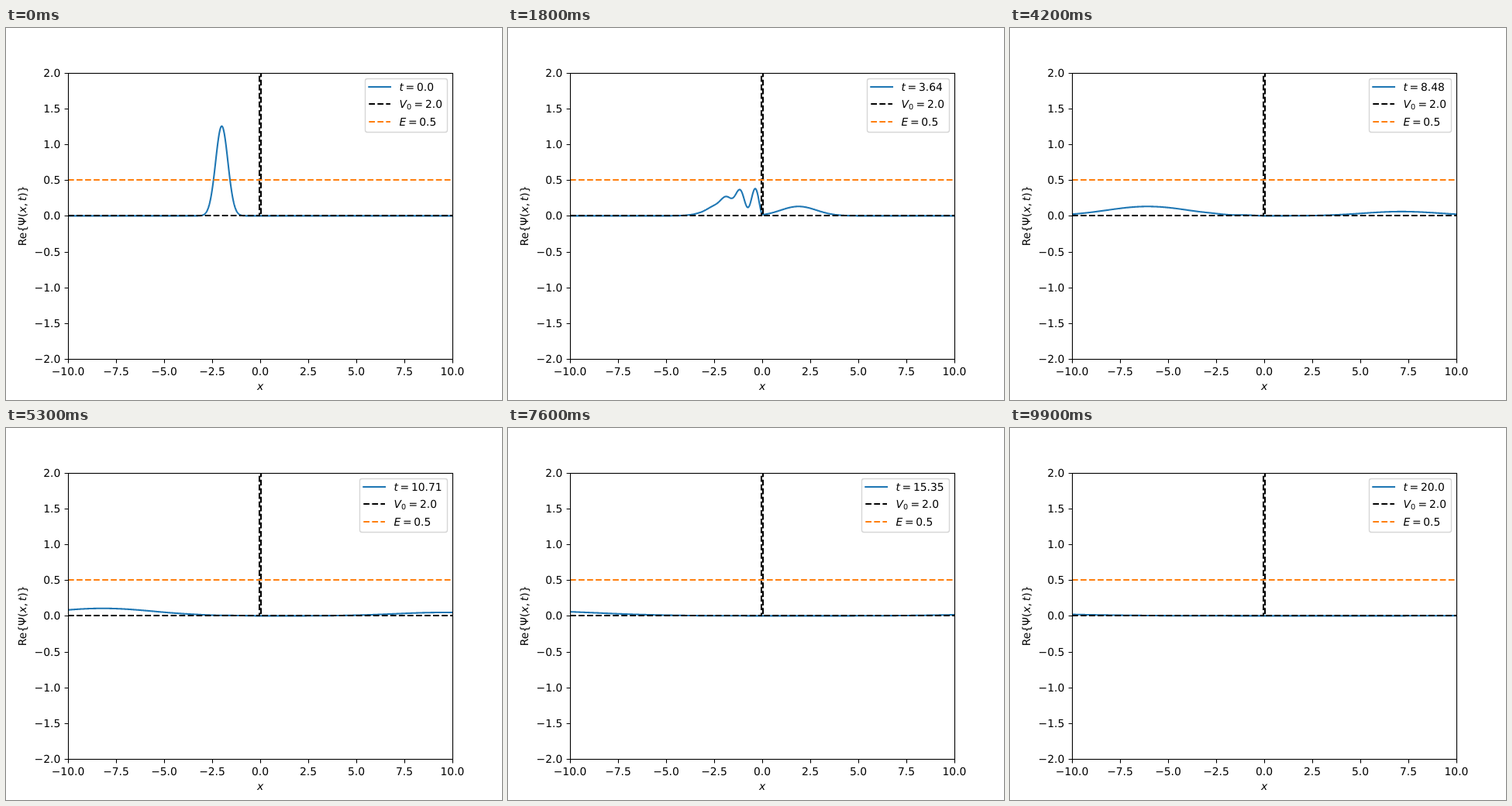
Recreate the animation shown at these times as an HTML page. Size 640 by 480 pixels, loop 10 s.

```html
<!DOCTYPE html>
<html lang="en">
<head>
<meta charset="utf-8">
<title>Wave packet at a barrier</title>
<style>
  html, body { margin: 0; width: 100%; height: 100%; overflow: hidden; background: #fff; }
  svg { display: block; width: 640px; height: 480px; }
  text { font: 13.889px "DejaVu Sans", sans-serif; text-rendering: geometricPrecision; white-space: pre; }
  .it { font-style: italic; }
  .line { fill: none; stroke-width: 2.083; stroke-linejoin: round; }
  .dash { stroke-dasharray: 7.708 3.333; }
  .wave { stroke: #1f77b4; }
  .wall { stroke: #000; stroke-linejoin: miter; }
  .energy { stroke: #ff7f0e; }
  .axis { fill: none; stroke: #000; stroke-width: 1.111; }
</style>
</head>
<body>
<svg viewBox="0 0 640 480">
  <clipPath id="plot"><rect x="80" y="58" width="496" height="369"/></clipPath>
  <g clip-path="url(#plot)">
    <path id="wave" class="line wave"/>
    <path class="line wall dash" d="M80 242H327V58H329V242H576"/>
    <path class="line energy dash" d="M80 196H576"/>
  </g>
  <path id="ticks" class="axis"/>
  <rect class="axis" x="80.5" y="58.5" width="496" height="369"/>
  <g id="labels"></g>
  <text class="it" x="328" y="467" text-anchor="middle">x</text>
  <text transform="translate(26 242.4) rotate(-90)" text-anchor="middle">Re{Ψ(<tspan class="it">x</tspan>,<tspan class="it" dx="2.7">t</tspan>)}</text>

  <rect id="box" y="65.5" height="69" rx="2.8" fill="#fff" stroke="#d6d6d6" stroke-width="1.389"/>
  <g id="legend">
    <path class="line wave" stroke-linecap="square" d="M468.3 76H496"/>
    <path class="line wall dash" d="M468.3 98H496"/>
    <path class="line energy dash" d="M468.3 121H496"/>
    <text x="507.4" y="81"><tspan class="it">t</tspan><tspan dx="2.7">=</tspan><tspan id="clock" dx="2.7">0.0</tspan></text>
    <text x="507.4" y="103"><tspan class="it">V</tspan><tspan dy="2.2" font-size="9.722" style="font-size:9.722px">0</tspan><tspan dx="3.5" dy="-2.2">=</tspan><tspan dx="2.7">2.0</tspan></text>
    <text x="507.4" y="126"><tspan class="it">E</tspan><tspan dx="2.7">=</tspan><tspan dx="2.7">0.5</tspan></text>
  </g>
</svg>
<script>
const $ = id => document.getElementById(id);

// Axes
const toX = x => 328 + 24.8 * x;
const toY = y => 242.4 - 92.4 * y;
const snap = v => Math.floor(v + 0.5) + 0.5;
let ticks = '';
function label(x, y, value, anchor) {
  const el = document.createElementNS('http://www.w3.org/2000/svg', 'text');
  el.setAttribute('x', x);
  el.setAttribute('y', y);
  el.setAttribute('text-anchor', anchor);
  el.textContent = value.toFixed(1).replace('-', '\u2212');
  $('labels').append(el);
}
for (let i = 0; i < 9; i++) {
  const x = 2.5 * i - 10, y = 0.5 * i - 2;
  ticks += `M${snap(toX(x))} 427.5v4.9M80.5 ${snap(toY(y))}h-4.9`;
  label(toX(x), 448, x, 'middle');
  label(70.3, Math.round(toY(y) + 5), y, 'end');
}
$('ticks').setAttribute('d', ticks);

// Gaussian packet on a square barrier, with m = 1 and h = 1
const WIDTH = 0.1, V0 = 2, START = -2, P0 = 1, SIGMA = 0.25;
const NP = 640, DP = 0.005, P_MIN = -0.6;
const NX = 801, DX = 0.025;
const TAU = 2 * Math.PI;
const K2 = 2 * V0 * TAU * TAU;
const stateRe = new Float64Array(NX * NP), stateIm = new Float64Array(NX * NP);
const waveNum = new Float64Array(NP), weight = new Float64Array(NP);

// Scattering state for each momentum, at every x
for (let j = 0; j < NP; j++) {
  const p = P_MIN + (j + 0.5) * DP, k = TAU * p;
  const kap2 = K2 - k * k, q = Math.sqrt(Math.abs(kap2));
  const ch = d => kap2 > 0 ? Math.cosh(q * d) : Math.cos(q * d);
  const sh = d => (kap2 > 0 ? Math.sinh(q * d) : Math.sin(q * d)) / q;
  const S = sh(WIDTH);
  const dr = 2 * k * ch(WIDTH), di = (kap2 - k * k) * S, n = dr * dr + di * di;
  const tr = 2 * k * dr / n, ti = -2 * k * di / n;
  const rr = -K2 * S * di / n, ri = -K2 * S * dr / n;
  waveNum[j] = k;
  weight[j] = DP * (TAU * SIGMA ** 2) ** -0.25 * Math.exp(-((p - P0) ** 2) / (4 * SIGMA ** 2));

  for (let i = 0; i < NX; i++) {
    const x = i * DX - 10, at = i * NP + j;
    if (x < -WIDTH / 2) {
      const c = Math.cos(k * (x + WIDTH / 2)), s = Math.sin(k * (x + WIDTH / 2));
      stateRe[at] = c + rr * c + ri * s;
      stateIm[at] = s + ri * c - rr * s;
    } else {
      const d = x - WIDTH / 2, inside = d < 0;
      const c = inside ? ch(d) : Math.cos(k * d);
      const s = inside ? k * sh(d) : Math.sin(k * d);
      stateRe[at] = tr * c - ti * s;
      stateIm[at] = tr * s + ti * c;
    }
  }
}

const phaseRe = new Float64Array(NP), phaseIm = new Float64Array(NP);
function wavePath(t) {
  for (let j = 0; j < NP; j++) {
    const k = waveNum[j];
    const a = -k * (START + WIDTH / 2) - k * k * t / (2 * TAU);
    phaseRe[j] = weight[j] * Math.cos(a);
    phaseIm[j] = weight[j] * Math.sin(a);
  }
  const points = [];
  for (let i = 0, at = 0; i < NX; i++) {
    let re = 0, im = 0;
    for (let j = 0; j < NP; j++, at++) {
      re += phaseRe[j] * stateRe[at] - phaseIm[j] * stateIm[at];
      im += phaseRe[j] * stateIm[at] + phaseIm[j] * stateRe[at];
    }
    points.push(toX(i * DX - 10).toFixed(2) + ' ' + toY(re * re + im * im).toFixed(2));
  }
  return 'M' + points.join('L');
}

// 100 steps of 100 ms covering t = 0 to 20
const STEPS = 100;
let shown = -1;
function draw() {
  const step = Math.floor(performance.now() / 100) % STEPS;
  if (step !== shown) {
    shown = step;
    const t = 20 * step / (STEPS - 1);
    let text = String(+t.toFixed(2));
    if (!text.includes('.')) text += '.0';
    const shift = text.length > 4 ? 7 : 0;
    $('wave').setAttribute('d', wavePath(t));
    $('clock').textContent = text;
    $('legend').setAttribute('transform', `translate(${-shift} 0)`);
    $('box').setAttribute('x', 463.5 - shift);
    $('box').setAttribute('width', 106 + shift);
  }
  requestAnimationFrame(draw);
}
draw();
</script>
</body>
</html>
```
